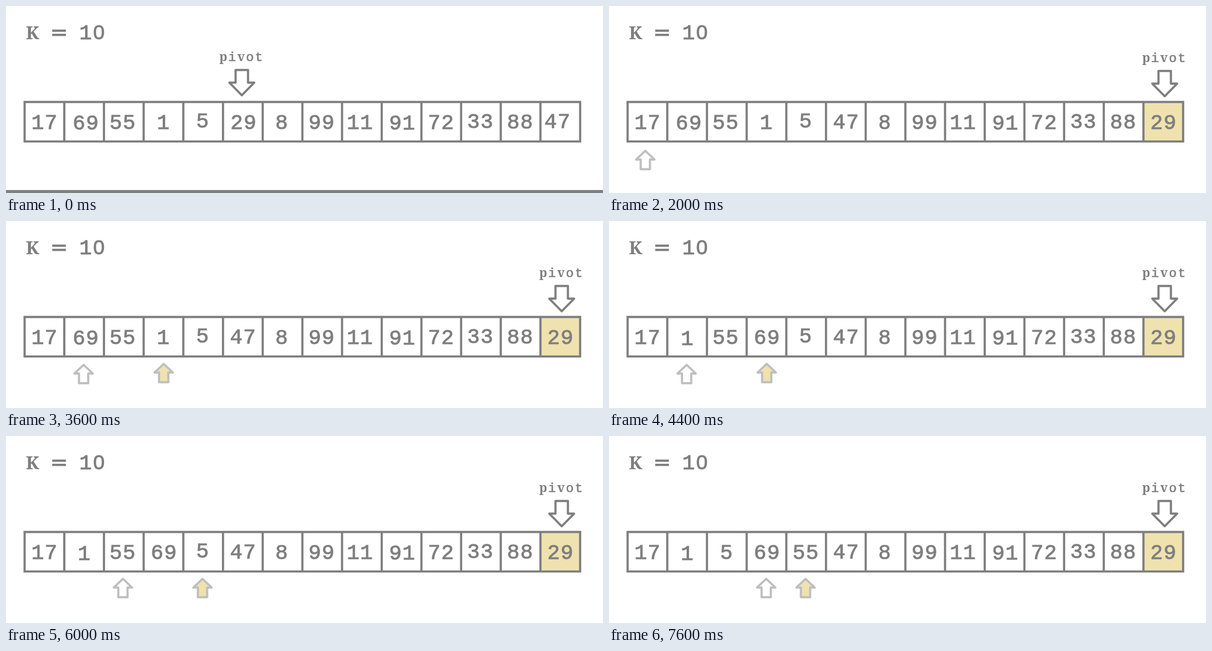
These frames come from a looping animation (1200 by 377 pixels, 8000 ms). An HTML page with a canvas:

```html
<!DOCTYPE html>
<html lang="en">
<head>
<meta charset="utf-8">
<title>Quickselect partition</title>
<style>
html, body { margin: 0; width: 100%; height: 100%; overflow: hidden; background: #fff; }
canvas { display: block; }
</style>
</head>
<body>
<canvas id="stage" width="1200" height="377"></canvas>
<script>
const ctx = document.getElementById('stage').getContext('2d');
const GREY = '#7f7f7f', LIGHT = '#bfbfbf', SAND = '#efe2af';
const LOOP = 8000, LEFT = 37.4, TOP = 193.5, CELL = 79.76, HEIGHT = 79.6;

// label, centre x, centre y for each slot
const start = [
  ['17', 77, 235], ['69', 160, 235.5], ['55', 234, 234.5], ['1', 316, 235],
  ['5', 395, 232], ['29', 477, 235], ['8', 554, 234.5], ['99', 634, 234.5],
  ['11', 711, 235], ['91', 796, 236], ['72', 874, 235], ['33', 953, 233],
  ['88', 1033, 234], ['47', 1108, 233]
];

// Each step keeps everything from the step before it unless it changes it.
const steps = [
  { at: 0, pivot: [474, 129], bar: true },
  { at: 1200, pivot: [1117, 131], sorted: true, set: { 5: ['47', 476, 233.5], 13: ['29', 1114, 235] } },
  { at: 2000, bar: false, low: [73, 292] },
  { at: 2800, low: [156, 290], scan: [235, 290] },
  { at: 3600, scan: [317, 288] },
  { at: 4400, set: { 1: ['1', 157, 237], 3: ['69', 317, 234.5] } },
  { at: 5200, low: [235, 288] },
  { at: 6000, scan: [395, 288] },
  { at: 6800, set: { 2: ['5', 236, 234.5], 4: ['55', 395, 234.5] } },
  { at: 7600, low: [316, 288] }
];

function stateAt(time) {
  const state = { cells: [...start] };
  for (const step of steps) {
    if (step.at > time) break;
    Object.assign(state, step);
    Object.assign(state.cells, step.set);
  }
  return state;
}

// Slab letters come from a bold serif, the rest from lighter faces with an outline.
function fontFor(char, size) {
  if (/[Kpv]/.test(char)) return `bold ${size * 0.83}px "Noto Serif", serif`;
  if (char === '0') return `${size * 0.93}px "Liberation Sans", sans-serif`;
  if (char === '=') return `${size * 0.95}px "DejaVu Sans", sans-serif`;
  return `${size * (/[iot]/.test(char) ? 0.87 : 0.95)}px "Liberation Mono", monospace`;
}

// Typewriter text: every character is centred on a fixed pitch.
function text(label, x, baseline, size) {
  const pitch = size * 0.6;
  ctx.fillStyle = ctx.strokeStyle = GREY;
  ctx.lineWidth = size * 0.025;
  ctx.textAlign = 'center';
  [...label].forEach((char, i) => {
    const cx = x + (i - (label.length - 1) / 2) * pitch;
    const font = fontFor(char, size);
    ctx.font = font;
    ctx.fillText(char, cx, baseline);
    if (!font.startsWith('bold')) ctx.strokeText(char, cx, baseline);
  });
}

// Block arrow with its tip at (x, y); dir is -1 for up and 1 for down.
function arrow([x, y], dir, shaft, head, neck, length, color, width, fill) {
  const points = [[0, 0], [head, neck], [shaft, neck], [shaft, length],
    [-shaft, length], [-shaft, neck], [-head, neck]];
  ctx.beginPath();
  points.forEach(([px, py]) => ctx.lineTo(x + px, y - dir * py));
  ctx.closePath();
  ctx.fillStyle = fill;
  ctx.fill();
  ctx.strokeStyle = color;
  ctx.lineWidth = width;
  ctx.lineJoin = 'round';
  ctx.stroke();
}

const pointer = (tip, fill) => arrow(tip, -1, 9.3, 18.5, 17.5, 37, LIGHT, 4.4, fill);

function grid(sorted) {
  const right = LEFT + CELL * 14;
  if (sorted) {
    ctx.fillStyle = SAND;
    ctx.fillRect(right - CELL, TOP, CELL, HEIGHT);
  }
  ctx.strokeStyle = GREY;
  ctx.lineJoin = 'miter';
  ctx.lineWidth = 4.4;
  ctx.beginPath();
  ctx.rect(LEFT, TOP, right - LEFT, HEIGHT);
  for (let i = 1; i < 14; i++) {
    ctx.moveTo(LEFT + i * CELL, TOP);
    ctx.lineTo(LEFT + i * CELL, TOP + HEIGHT);
  }
  ctx.stroke();
}

function draw(now) {
  const { cells, pivot, bar, sorted, low, scan } = stateAt(now % LOOP);
  ctx.fillStyle = '#fff';
  ctx.fillRect(0, 0, 1200, 377);

  text('K = 10', 120, 66.5, 44.5);
  text('pivot', pivot[0] - 1.5, pivot[1] - 18, 29.8);
  arrow([pivot[0], pivot[1] + 51], 1, 12.5, 25, 25.5, 51, GREY, 4.4, '#fff');

  grid(sorted);
  for (const [label, x, y] of cells) text(label, x, y + 13.3, 44.5);
  if (low) pointer(low, '#fff');
  if (scan) pointer(scan, SAND);

  if (bar) {
    ctx.fillStyle = GREY;
    ctx.fillRect(0, 371, 1200, 6);
  }
  requestAnimationFrame(draw);
}
requestAnimationFrame(draw);
</script>
</body>
</html>
```
